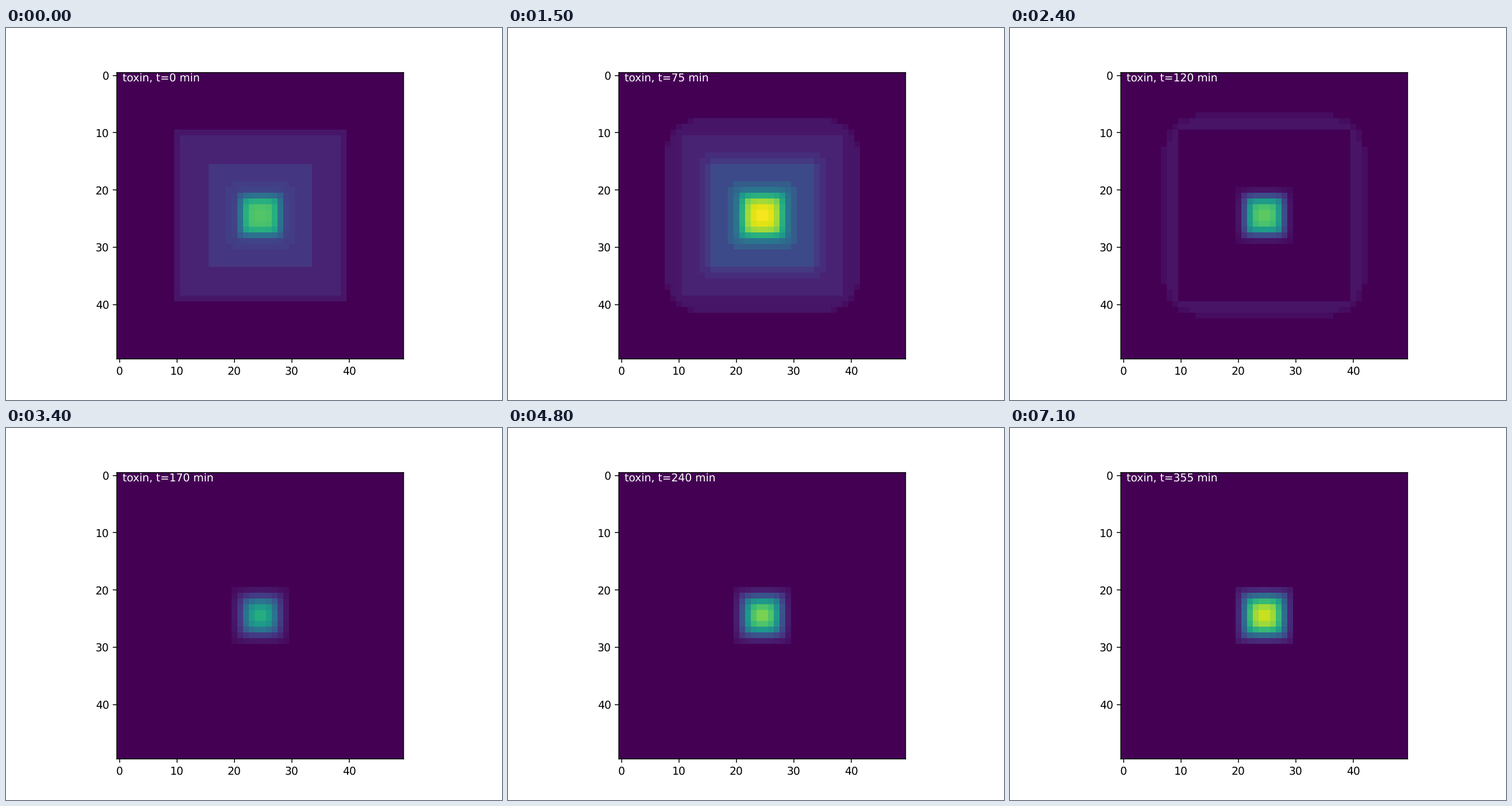
A matplotlib script that plays this animation: 864x648 px, repeating every 7.2 s.

```python
import numpy as np
import matplotlib.pyplot as plt
from matplotlib.animation import FuncAnimation

plt.rcParams["path.snap"] = False
plt.rcParams["text.hinting"] = "no_hinting"

FRAMES, INTERVAL = 72, 100
SIZE = 50
MINUTES = 5      # simulated minutes per frame
GROWTH = 15      # frames of early growth
CLEAR = 20       # frame at which the inner area is cleared
LOW = 33         # frame at which the core is weakest
RATE = 0.054     # recovery per frame

# Cell distance from the middle of the grid
dist = np.floor(np.abs(np.arange(SIZE) - (SIZE - 1) / 2))
U, V = np.meshgrid(dist, dist)
FAR, NEAR = np.maximum(U, V), np.minimum(U, V)
ROUND = (FAR ** 5 + NEAR ** 5) ** 0.2    # rounded-square distance
CORE, INNER = FAR <= 4, FAR <= 14

SQUARES = {14: 0.06, 13: 0.04, 8: 0.06}  # reach: fixed level
SPREAD = {10: 0.03, 9: 0.035}            # reach: level gained while growing


def mix(a, b, x):
    return a + (b - a) * x


def clipped(reach):
    """Square without its four corner cells."""
    return (FAR <= reach) & (NEAR < reach)


def core_shape(i):
    """Height, half-width and edge softness of the core."""
    if i < CLEAR:
        x = min(i / GROWTH, 1)
        return mix(0.575, 0.77, x), mix(2.75, 3.1, x), mix(0.5, 0.7, x)
    if i < LOW:
        x = (i - CLEAR) / (LOW - CLEAR)
        x = x * x * (3 - 2 * x)
        return mix(0.79, 0.63, x), mix(2.65, 2.28, x), mix(0.5, 0.75, x)
    x = 1 - np.exp(-RATE * (i - LOW))
    return mix(0.63, 0.98, x), mix(2.28, 2.78, x * x), mix(0.75, 0.69, x)


def core(i):
    height, width, soft = core_shape(i)

    def falloff(d):
        return 1 / (1 + np.exp((d - width) / soft))

    corner = (falloff(NEAR) / falloff(0)) ** (0.9 - 0.15 * FAR)
    return np.where(CORE, height * falloff(FAR) * corner, 0)


def rim(i):
    """Faint front that creeps outwards, then fades."""
    front = 16.95 + 0.048 * (i - GROWTH)
    strength = np.interp(i, [0, GROWTH, 24, LOW], [0, 1, 0.95, 0])
    level = 0.035 * (ROUND <= front) + 0.02 * (ROUND <= front - 0.45)
    return np.where(INNER, 0, strength * level)


def plateaus(i):
    fixed = sum(level * (FAR <= reach) for reach, level in SQUARES.items())
    grown = sum(level * clipped(reach) for reach, level in SPREAD.items())
    return fixed + grown * i / GROWTH


def field(i):
    if i >= CLEAR:
        return rim(i) + core(i)
    halo = mix(0.02, 0.07, i / GROWTH) * clipped(5)
    return rim(i) + plateaus(i) + np.maximum(halo, core(i))


fig = plt.figure(figsize=(6.4, 4.8), dpi=135)
ax = fig.add_axes([286 / 1280, 106 / 960, 740 / 1280, 739 / 960])
image = ax.imshow(field(0), cmap="viridis", vmin=0, vmax=1,
                  interpolation="nearest", aspect="auto")
ax.set_xticks(range(0, SIZE, 10))
ax.set_yticks(range(0, SIZE, 10))
label = ax.text(0.5, 1, "", color="white")


def draw(i):
    image.set_data(field(i))
    label.set_text(f"toxin, t={i * MINUTES} min")
    return image, label


anim = FuncAnimation(fig, draw, frames=FRAMES, interval=INTERVAL,
                     repeat=True, repeat_delay=0)
plt.show()
```
